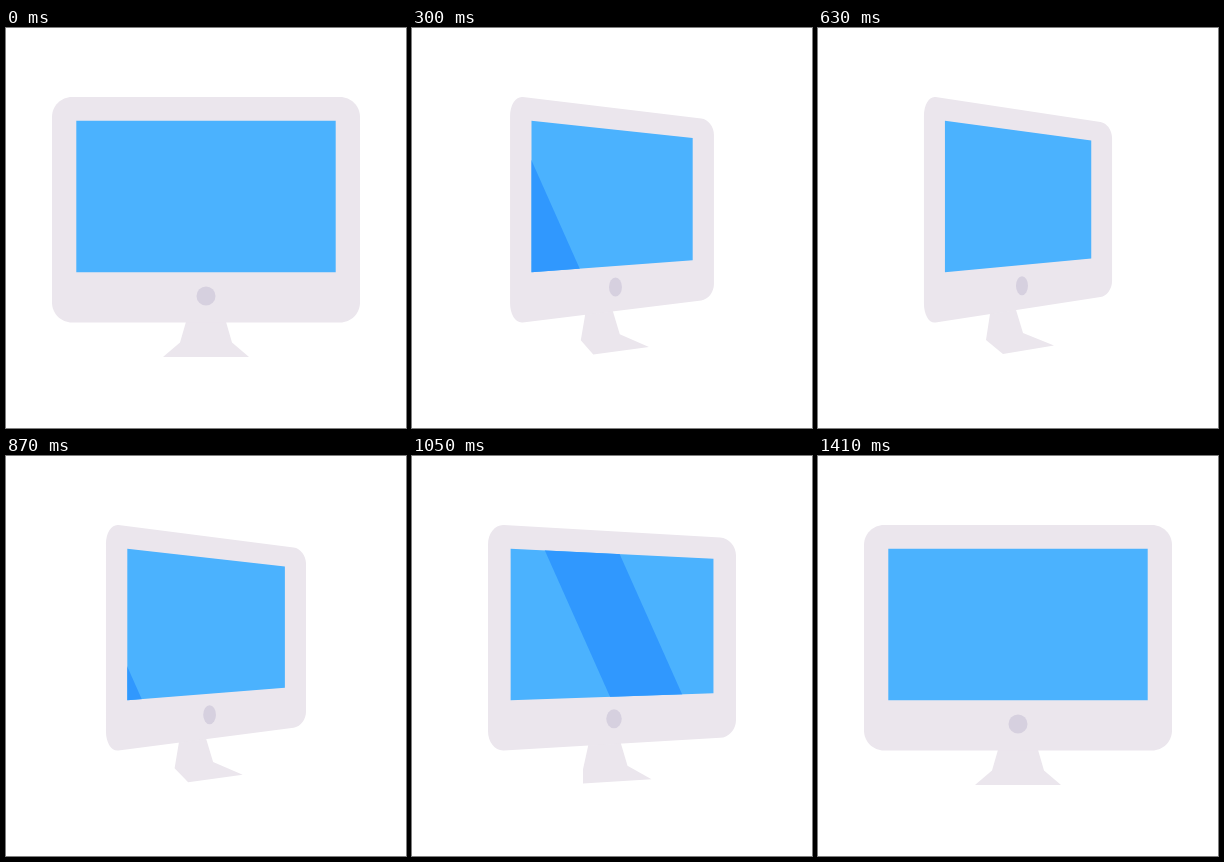
Animation of 400 by 400 pixels, one loop 3620 ms. Source, as an HTML page:

```html
<!DOCTYPE html>
<html lang="en">
<head>
<meta charset="utf-8">
<title>Turning monitor</title>
<style>
  html, body { margin: 0; width: 100%; height: 100%; overflow: hidden; background: #fff; }
  svg { display: block; width: 100%; height: 100%; }
</style>
</head>
<body>
<svg viewBox="0 0 400 400">
  <clipPath id="glass"><path id="mask"/></clipPath>
  <g fill="#ebe6ed"><path id="stand"/><path id="body"/></g>
  <ellipse id="button" fill="#d6d0df"/>
  <path id="screen" fill="#4bb2fe"/>
  <g clip-path="url(#glass)"><path id="shine" fill="#3098fe"/></g>
</svg>
<script>
const LOOP = 3620, STEP = 30, TURN = 600;
const SLANT = 0.4455, BAND = 73.2;

// Neck, waist and foot of the stand: facing front, then fully turned
const FRONT = [[184, 280], [174, 314.5], [157, 329], [243, 329], [226, 314.5], [216, 280]];
const TURNED = [[173.5, 276], [168, 312], [185, 326], [236, 317.5], [205, 305], [195, 272]];

const set = (id, attrs) => {
  for (const name in attrs) document.getElementById(id).setAttribute(name, attrs[name]);
};
const clamp01 = v => Math.min(1, Math.max(0, v));
const smooth = s => s * s * (3 - 2 * s);
const lerp = (a, b, k) => a + (b - a) * k;
const between = (p, q, k) => [lerp(p[0], q[0], k), lerp(p[1], q[1], k)];
const poly = pts => "M" + pts.join("L") + "Z";

// Upright left and right sides; the right one shrinks away from the viewer
const panel = (left, right, top, bottom, dropTop, riseBottom) =>
  [[left, top], [right, top + dropTop], [right, bottom - riseBottom], [left, bottom]];

// Rounds a panel's corners, rx along the long edges and ry along the sides
function rounded(pts, rx, ryLeft, ryRight) {
  const toward = (p, q, d) => between(p, q, d / Math.hypot(q[0] - p[0], q[1] - p[1]));
  const parts = pts.map((p, i) => {
    const prev = pts[(i + 3) % 4], next = pts[(i + 1) % 4];
    const ry = i === 0 || i === 3 ? ryLeft : ryRight;
    const a = toward(p, prev, i % 2 ? rx : ry);
    const b = toward(p, next, i % 2 ? ry : rx);
    return `${a}C${between(a, p, 0.55)} ${between(b, p, 0.55)} ${b}`;
  });
  return poly(parts);
}

// cubic-bezier(1/3, 0, 0, 1)
function ease(x) {
  let lo = 0, hi = 1;
  for (let i = 0; i < 30; i++) {
    const s = (lo + hi) / 2;
    if (s - 2 * s * s + 2 * s ** 3 < x) lo = s; else hi = s;
  }
  return smooth(lo);
}

// Right edge of the shine at the top of the screen, for two passes
function sweep(t) {
  const pass = t < 720 ? 913.3 + (t - 300) * 1.04 : t;
  return -191.7 + 612.8 * smooth(clamp01((pass - 330) / 1200));
}

function draw(t) {
  const k = ease(clamp01(1 - Math.abs(t - TURN) / TURN));

  const frame = panel(46 + 60 * k, 354 - 60 * k, 69 - 1.8 * k, 294.5 + 1.8 * k, 28.5 * k, 29 * k);
  set("body", { d: rounded(frame, 20 - 8.3 * k, 20 + 0.8 * k, 20 - 6 * k) });
  set("stand", { d: poly(FRONT.map((p, i) => between(p, TURNED[i], k))) });
  set("button", { cx: 200 + 4 * k, cy: 268 - 10.3 * k, rx: 9.5 - 3.5 * k, ry: 9.5 });

  const glass = poly(panel(70.3 + 56.7 * k, 329.7 - 56.5 * k, 92.8, 244.2, 19.7 * k, 13.8 * k));
  set("screen", { d: glass });
  set("mask", { d: glass });

  const r = sweep(t), x = y => r + (y - 93) * SLANT;
  set("shine", { d: poly([[x(80) - BAND, 80], [x(80), 80], [x(260), 260], [x(260) - BAND, 260]]) });
}

const start = performance.now();
function tick() {
  const t = (performance.now() - start) % LOOP;
  draw(Math.floor(t / STEP) * STEP);
  requestAnimationFrame(tick);
}
draw(0);
requestAnimationFrame(tick);
</script>
</body>
</html>
```
